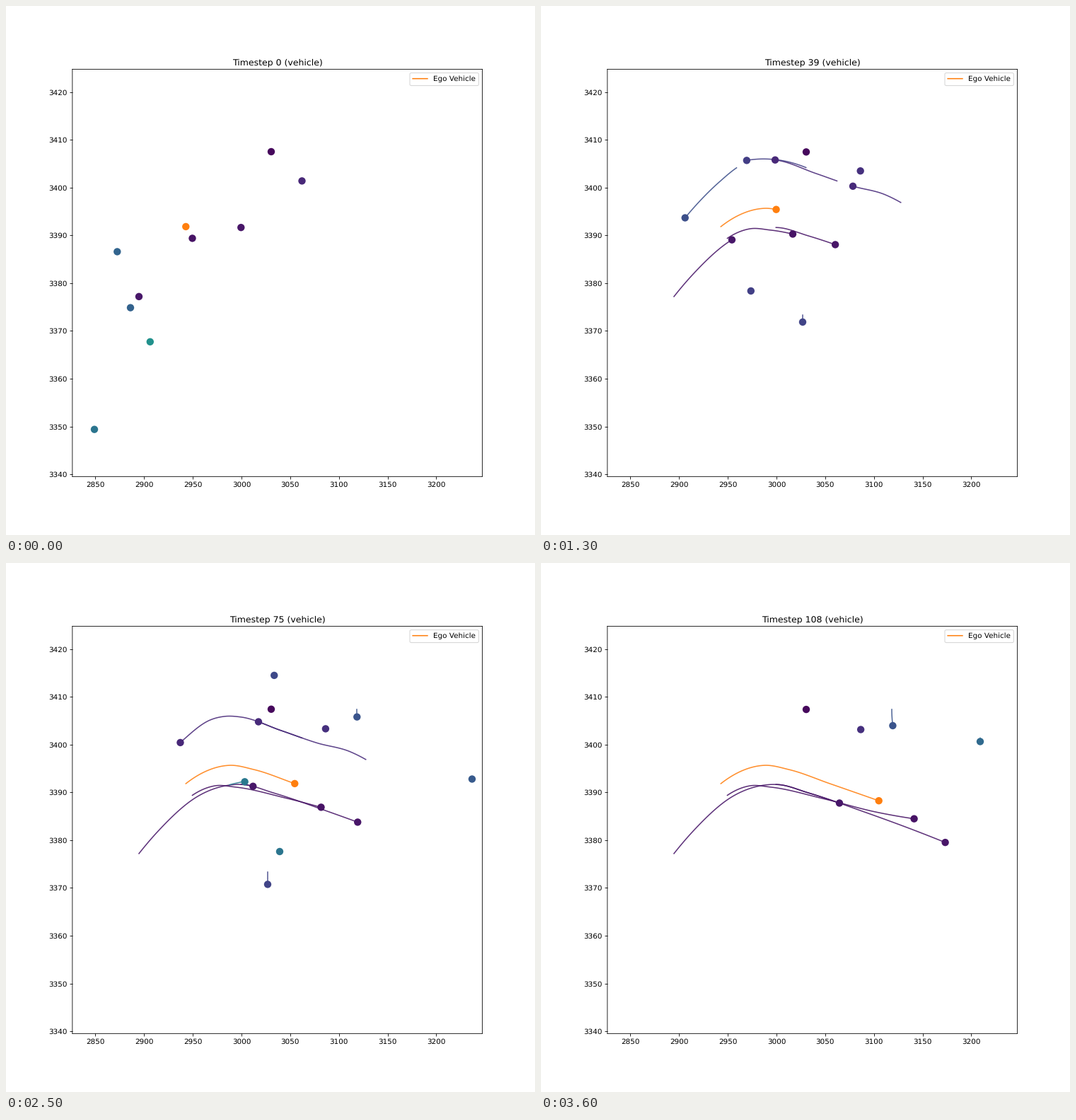
Animation, 748 px wide and 748 px high, one loop 3.7 s. Source, as a matplotlib script:

```python
import numpy as np
import matplotlib.pyplot as plt
from matplotlib.animation import FuncAnimation
from matplotlib.transforms import Affine2D

SIZE = 748
FRAMES = 37
STEPS_PER_FRAME = 3
LAG = 0.6          # frames before the first cars start to roll
EGO = "#ff7f0e"

plt.rcParams.update({"path.snap": False, "text.hinting": "none"})
fig, ax = plt.subplots(figsize=(10, 10), dpi=SIZE / 10)
fig.subplots_adjust(left=0.1255, right=0.9005, bottom=0.1105, top=0.8805)
# Roads are laid out in stage pixels with y pointing down.
stage = Affine2D().scale(1 / SIZE, -1 / SIZE).translate(0, 1) + fig.transFigure


def road(*points):
    """Smooth curve y(x) through a few points, ordered by x."""
    px, py = np.array(points, dtype=float).T
    slope = np.gradient(py, px, edge_order=2)

    def y(x):
        i = np.clip(np.searchsorted(px, x) - 1, 0, len(px) - 2)
        h = px[i + 1] - px[i]
        u = (x - px[i]) / h
        ease = u * u * (3 - 2 * u)
        return (py[i] + (py[i + 1] - py[i]) * ease
                + h * u * (1 - u) * (slope[i] * (1 - u) - slope[i + 1] * u))
    return y


def drive(lane, x0, speed):
    """Follow a road at constant horizontal speed."""
    def route(age):
        x = x0 + speed * age
        return x, lane(x)
    return route


def roll(x, y, vx=0.0, vy=0.0):
    """Straight slow motion; a parked car without speed."""
    return lambda age: (x + vx * age, y + vy * age)


def back_and_forth(age):
    return 370 + 0 * age, 437 + np.minimum(17.4, np.minimum(3.3 * age, 4.5 * (19 - age)))


def slow_down(age):
    return 496 + 0.1 * age, 207 + 23 * np.sqrt(age / 14)


class Vehicle:
    def __init__(self, color, route, start=None, last=FRAMES - 1):
        self.color = plt.cm.viridis(color) if isinstance(color, float) else color
        self.route, self.last = route, last
        self.first = 0 if start is None else start
        self.start = LAG if start is None else start
        self.trail, = ax.plot([], [], color=self.color, lw=1.5, alpha=0.88,
                              transform=stage, zorder=2)

    def move(self, t):
        """Update the trail and return the current position."""
        if not self.first <= t <= self.last:
            self.trail.set_data([], [])
            return np.nan, np.nan
        x, y = self.route(np.linspace(0, max(t - self.start, 0), 100))
        self.trail.set_data(x, y)
        return x[-1], y[-1]


ego_lane = road((254, 312.2), (281.5, 295), (316, 286.1), (351, 292.2),
                (408.5, 312), (480, 337))
east = road((176, 426.6), (218, 376), (271, 330), (310, 315), (335, 313.3),
            (378, 325), (458, 352.3), (526, 377.2), (575, 396.5))
merge = road((263, 328.8), (295.6, 315), (324, 316.8), (399, 333.2),
             (474.5, 352.3), (530, 362))
west = road((196, 309), (227, 273.2), (250.6, 250.2), (288, 222.3),
            (310, 216.8), (332, 217.8), (389, 236.9), (440, 254.5),
            (487, 267), (509, 278))
west_outer = road((226, 250), (250.6, 232.2), (289, 218.7), (323, 216.5),
                  (375, 228.6))
ramp = road((316, 313.6), (326, 311.2), (337.5, 309.3), (345, 310.5))

# Colour runs along viridis: the shorter the stay, the brighter.
vehicles = [
    # Through traffic
    Vehicle(0.055, drive(east, 332.3, 6.76)),
    Vehicle(0.05, drive(merge, 263.5, 7.46)),
    Vehicle(0.06, drive(east, 188, 6.61)),
    Vehicle(0.31, drive(east, 176, 7.05), last=8),
    Vehicle(0.40, drive(ramp, 316, 7.2), start=22, last=26),
    Vehicle(0.11, drive(west, 418.5, -7.05), last=28),
    Vehicle(0.12, drive(west, 508.7, -7.0), start=3.33, last=35),
    Vehicle(0.18, drive(west_outer, 374.7, -6.76), start=LAG, last=23),
    Vehicle(0.24, drive(west, 276.5, -5.87), start=LAG, last=14),
    # Side streets
    Vehicle(0.39, roll(125, 598.7, -0.55, -5.9), last=10),
    Vehicle(0.20, back_and_forth, start=10, last=29),
    Vehicle(0.45, roll(379.8, 530.5, 0.2, 1.6), start=18, last=21),
    Vehicle(0.26, slow_down, start=22),
    Vehicle(0.34, roll(621, 247.5, 0, 0.5), start=26),
    # Parked
    Vehicle(0.02, roll(375, 206, 0, 0.03)),
    Vehicle(0.32, roll(157.3, 347.4), last=9),
    Vehicle(0.50, roll(203.8, 474.8), last=2),
    Vehicle(0.19, roll(296.8, 402.9), start=3, last=22),
    Vehicle(0.14, roll(451.6, 232.8, 0.02, 0.1), start=9),
    Vehicle(0.22, roll(378.8, 158, 0.05, 0.1), start=16, last=32),
    Vehicle(0.28, roll(659, 305.5), start=24, last=32),
    Vehicle(0.39, roll(387, 408), start=23, last=27),
    Vehicle(EGO, drive(ego_lane, 254.3, 6.31)),
]
dots = ax.scatter(np.zeros(len(vehicles)), np.zeros(len(vehicles)), s=100,
                  c=[v.color for v in vehicles], linewidths=0,
                  transform=stage, zorder=3)

ax.set_xlim(2826.4, 3247.3)
ax.set_ylim(3339.53, 3424.77)
ego_key, = ax.plot([], [], color=EGO, label="Ego Vehicle")
ax.legend(handles=[ego_key], loc="upper right")
title = ax.set_title("")


def update(i):
    title.set_text(f"Timestep {i * STEPS_PER_FRAME} (vehicle)")
    dots.set_offsets([v.move(i) for v in vehicles])
    return [title, dots]


anim = FuncAnimation(fig, update, frames=FRAMES, interval=100,
                     repeat=True, repeat_delay=0, blit=False)
plt.show()
```
